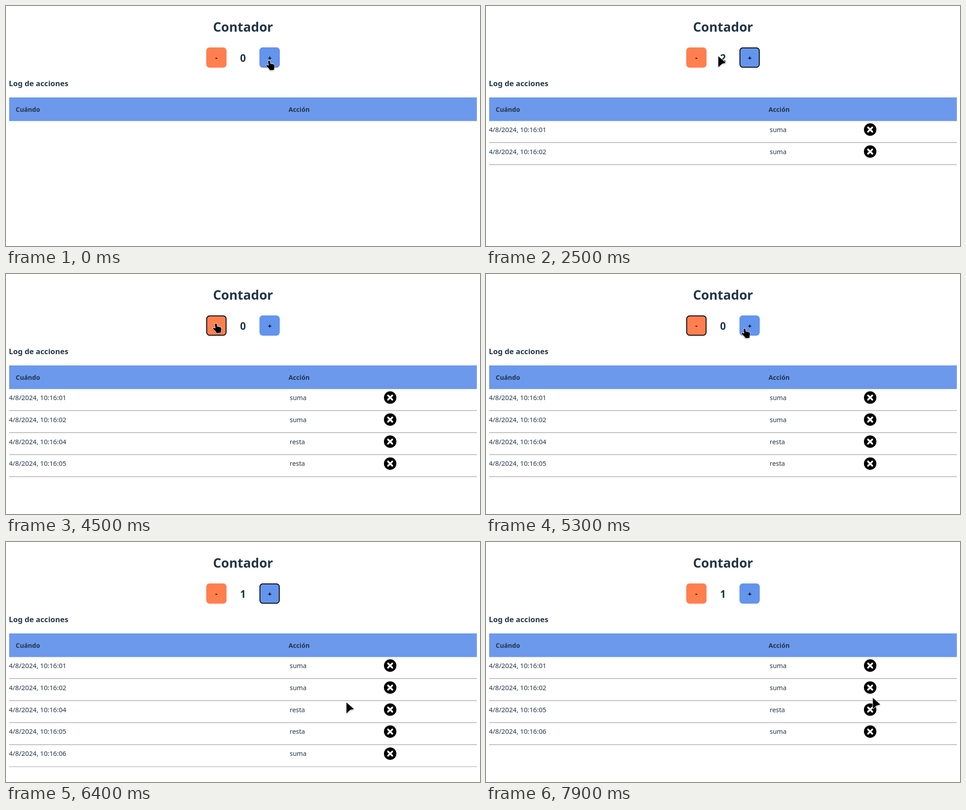
An HTML page for the animation above (8000 ms loop, 1051 px wide and 533 px high).

```html
<!DOCTYPE html>
<html lang="es">
<head>
<meta charset="utf-8">
<title>Contador</title>
<style>
  html, body { margin: 0; width: 100%; height: 100%; overflow: hidden; background: #fff; }
  svg { display: block; width: 1051px; height: 533px; font: 14.4px "Noto Sans", "Open Sans", sans-serif; fill: #213547; }
  .bold { font-weight: 700; }
  .mid { text-anchor: middle; }
  .sign { fill: #000; font-size: 15px; }
  .edge { fill: none; stroke: #646cff; }
  .ring { fill: none; stroke: #0a0a0a; stroke-width: 2; }
  .cursor { fill: #000; stroke: #fff; stroke-width: 1.8; stroke-linejoin: round; paint-order: stroke; filter: drop-shadow(0 1px 1px #0005); }
</style>
</head>
<body>
<svg viewBox="0 0 1051 533">
  <defs>
    <g id="remove">
      <circle r="13.8" fill="#000"/>
      <path d="M-4.7 -4.7L4.7 4.7M4.7 -4.7L-4.7 4.7" stroke="#fff" stroke-width="3.9" stroke-linecap="round"/>
    </g>
  </defs>

  <text class="bold mid" x="525.5" y="56.5" font-size="28.6">Contador</text>
  <text class="bold mid" id="count" x="525.5" y="124.3" font-size="22.5"></text>

  <g id="minus" transform="translate(444 92)">
    <rect width="45" height="45" rx="7.5" fill="#ff7f50"/>
    <rect class="edge" x=".5" y=".5" width="44" height="44" rx="7"/>
    <rect class="ring" x="1" y="1" width="43" height="43" rx="6.5"/>
    <text class="bold mid sign" x="22.5" y="27.5">-</text>
  </g>
  <g id="plus" transform="translate(562 92)">
    <rect width="45" height="45" rx="7.5" fill="#6495ed"/>
    <rect class="edge" x=".5" y=".5" width="44" height="44" rx="7"/>
    <rect class="ring" x="1" y="1" width="43" height="43" rx="6.5"/>
    <text class="bold mid sign" x="22.8" y="28.8">+</text>
  </g>

  <text class="bold" x="6.3" y="177.5" font-size="16.8">Log de acciones</text>
  <rect x="7" y="203" width="1037" height="52.5" fill="#6c99ec"/>
  <g class="bold" font-size="14.2">
    <text x="21.6" y="235">Cuándo</text>
    <text x="626.5" y="235">Acción</text>
  </g>
  <g id="log"></g>

  <g id="cursor" class="cursor">
    <path id="arrow" d="M0 .8L15.4 14.6Q16.4 15.8 14.8 16.1L8.4 17.4L1.4 24Q0 25 0 23.2Z"/>
    <path id="hand" d="M-2.4 2C-2.6 -.5 1.4 -.9 1.8 1.6L2.6 6.4L9.6 8Q12 8.8 12 11.5L11.2 16L10.6 20.6L1.5 20.9Q.8 18.5 -2 16L-6 12Q-7.2 9.8 -4.8 9.2L-1 10.8Z"/>
  </g>
</svg>
<script>
  const LOOP = 8000, STEP = 100, FADE = 250;
  const PITCH = 48.9, ICON = { x: 851.8, y: 274.4, r: 13.8 };
  const $ = id => document.getElementById(id);

  // Each press gives focus; its effect shows on release
  const clicks = [
    { down: 1000, up: 1200, on: "plus" },
    { down: 2100, up: 2100, on: "plus" },
    { down: 3400, up: 3400, on: "minus" },
    { down: 4500, up: 4500, on: "minus" },
    { down: 5700, up: 5900, on: "plus" },
    { down: 7200, up: 7400, on: "remove", row: 2 }
  ];
  const kinds = { plus: { word: "suma", add: 1, x: 562 }, minus: { word: "resta", add: -1, x: 444 } };

  // Ease-out moves; ex and ey set how strongly each axis slows down
  const home = { x: 583.5, y: 121.5 };
  const moves = [
    { at: 2500, steps: 6, x: 465.5, y: 110, ex: 4.75, ey: 15 },
    { at: 5000, steps: 6, ...home, ex: 2.24, ey: 4 },
    { at: 6200, steps: 9, x: 852.5, y: 370, ex: 2.5, ey: 7 },
    { at: 7900, steps: 1, x: 857.8, y: 345.5, ex: 1, ey: 1 }
  ];

  const show = (el, on) => el.setAttribute("visibility", on ? "visible" : "hidden");

  function pointer(t) {
    let p = home;
    for (const m of moves) {
      if (t < m.at) break;
      const left = Math.max(0, 1 - ((t - m.at) / STEP + 1) / m.steps);
      p = { x: m.x + (p.x - m.x) * left ** m.ex, y: m.y + (p.y - m.y) * left ** m.ey };
    }
    return p;
  }

  const overButton = (id, { x, y }) =>
    x >= kinds[id].x && x <= kinds[id].x + 45 && y >= 92 && y <= 137;

  function overIcon({ x, y }) {
    const row = Math.max(0, Math.round((y - ICON.y) / PITCH));
    return Math.hypot(x - ICON.x, y - ICON.y - row * PITCH) < ICON.r;
  }

  // Opacity of the hover border, from how long the pointer has been over
  function hover(id, t) {
    let held = 0;
    while (held <= FADE && overButton(id, pointer(t - held))) held += STEP;
    return Math.max(0, Math.min(1, (held - STEP) / FADE));
  }

  const entries = clicks.filter(c => kinds[c.on]).map(({ up, on }) => {
    const el = document.createElementNS("http://www.w3.org/2000/svg", "g");
    const sec = Math.floor((up + 700) / 1000);
    el.innerHTML = `<text x="6.4" y="279.8" font-size="14.7">4/8/2024, 10:16:0${sec}</text>
      <text x="629" y="279.8">${kinds[on].word}</text>
      <use href="#remove" x="${ICON.x}" y="${ICON.y}"/>
      <path d="M7 303.4H1044" stroke="#9a9a9a" stroke-width="1.2"/>`;
    $("log").append(el);
    return el;
  });

  function draw(t) {
    let count = 0, rows = [], next = 0;
    for (const { up, on, row } of clicks) {
      if (up > t) break;
      if (on === "remove") rows.splice(row, 1);
      else {
        count += kinds[on].add;
        rows.push(entries[next++]);
      }
    }
    $("count").textContent = count;
    entries.forEach(el => show(el, rows.includes(el)));
    rows.forEach((el, i) => el.setAttribute("transform", `translate(0 ${PITCH * i})`));

    const focus = clicks.filter(c => c.down <= t).pop()?.on;
    for (const id in kinds) {
      $(id).querySelector(".edge").setAttribute("opacity", hover(id, t));
      show($(id).querySelector(".ring"), focus === id);
    }

    const p = pointer(t);
    const hand = Object.keys(kinds).some(id => overButton(id, p)) || overIcon(p);
    $("cursor").setAttribute("transform", `translate(${p.x} ${p.y})`);
    show($("hand"), hand);
    show($("arrow"), !hand);
  }

  function tick() {
    draw(Math.floor(performance.now() % LOOP / STEP) * STEP);
    requestAnimationFrame(tick);
  }
  tick();
</script>
</body>
</html>
```
